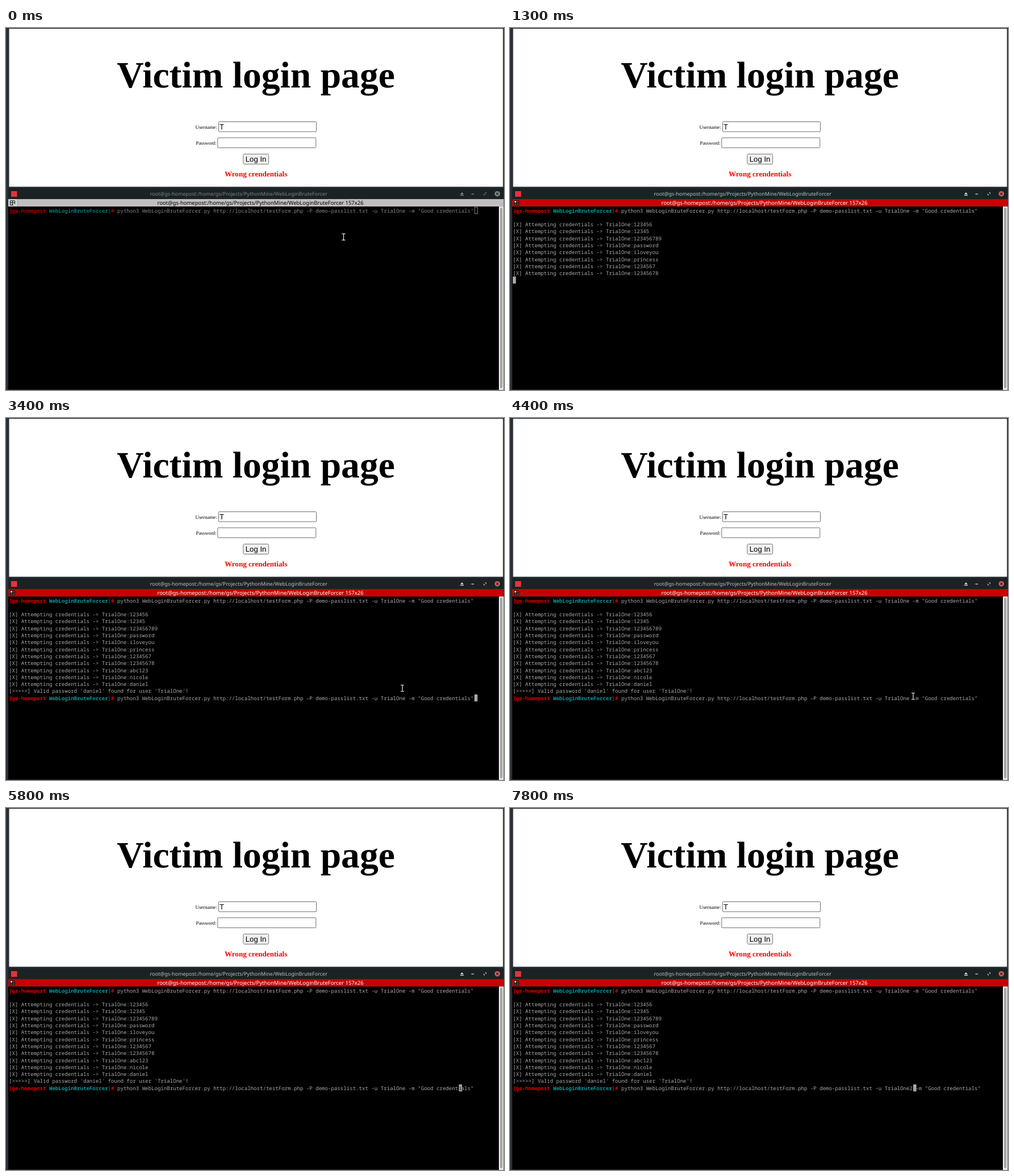
An HTML page that plays this animation: 877 by 639 pixels, repeating every 8 s.

```html
<!DOCTYPE html>
<html lang="en">
<head>
<meta charset="utf-8">
<title>Login form demo</title>
<style>
html, body { margin: 0; width: 100%; height: 100%; overflow: hidden; background: #2b2f37; }
svg { display: block; width: 877px; height: 639px; }
text { white-space: pre; text-rendering: geometricPrecision; }
.mid { text-anchor: middle; }
.serif { font-family: "Liberation Serif", serif; }
.sans { font-family: "Liberation Sans", sans-serif; font-size: 13.16px; }
.label { font-size: 8.77px; }
.ui { font-family: "Noto Sans", sans-serif; }
.mono { font-family: "Noto Sans Mono", monospace; font-size: 9.11px; }
.field { fill: #fff; stroke: #6e6e6e; }
.host { fill: #e00000; font-weight: bold; }
.dir { fill: #06989a; font-weight: bold; }
.dim { opacity: .78; }
</style>
</head>
<body>
<svg viewBox="0 0 877 639">
  <rect width="877" height="639" fill="#2b2f37"/>
  <rect x="5.5" y="1.4" width="869.7" height="278.8" fill="#fff"/>
  <text class="serif mid" x="440.1" y="104.6" font-size="65.6" font-weight="bold">Victim login page</text>
  <text class="serif label" x="333.6" y="178">Username:</text>
  <rect class="field" x="374.5" y="165.5" width="172" height="17.5" rx="1"/>
  <text class="sans" x="375.9" y="178.7">T</text>
  <text class="serif label" x="334.6" y="206.2">Password:</text>
  <rect class="field" x="372.8" y="193.8" width="173" height="17.6" rx="1"/>
  <rect x="417.8" y="222.5" width="44.8" height="17.8" rx="2" fill="#efefef" stroke="#767676"/>
  <text class="sans mid" x="440.1" y="236">Log In</text>
  <text class="serif mid" x="440.1" y="262.3" font-size="13.12" font-weight="bold" fill="#f00">Wrong crendentials</text>

  <rect x="4" y="282.5" width="872.5" height="19.5" fill="#1b2224"/>
  <rect x="9" y="288" width="10.5" height="10" fill="#e2343a"/>
  <g id="title"></g>
  <g id="tab"></g>
  <rect x="4" y="315.2" width="864" height="322.8" fill="#000"/>
  <rect x="868" y="315.2" width="8.3" height="323.6" fill="#f0f0f0"/>
  <rect x="870" y="317" width="4.4" height="319" rx="2.2" fill="#a6a6a6"/>
  <g id="term"></g>
  <g id="mouse">
    <path d="M-3 -5.5H3M0 -5.5V5.5M-3 5.5H3" fill="none" stroke="#000" stroke-width="3"/>
    <path d="M-3 -5.5H3M0 -5.5V5.5M-3 5.5H3" fill="none" stroke="#eee" stroke-width="1.2"/>
  </g>
</svg>
<script>
const LOOP = 8000, STEP = 100;
const LEFT = 5, TOP = 315.9, COL = 5.466, ROW = 12.29;
const USER = 'TrialOne', HOST = 'gs-homepost', TOOL = 'WebLoginBruteForcer';
const PATH = `root@${HOST}:/home/gs/Projects/PythonMine/${TOOL}`;
const HEAD = `python3 ${TOOL}.py http://localhost/testForm.php -P demo-passlist.txt -u ${USER}`;
const TAIL = ' -m "Good credentials"';
const COMMAND = HEAD + TAIL;
const PROMPT = `[${HOST} ${TOOL}]# `;
const START = PROMPT.length, END = START + COMMAND.length, EDIT = START + HEAD.length;
const PROMPT_SPANS = `<tspan class="host">[${HOST} </tspan><tspan class="dir">${TOOL}</tspan><tspan class="host">]# </tspan>`;

const guesses = '123456 12345 123456789 password iloveyou princess 1234567 12345678 abc123 nicole daniel'.split(' ');
const output = ['', ...guesses.map(g => `[X] Attempting credentials -&gt; ${USER}:${g}`),
  `[&gt;&gt;&gt;&gt;&gt;] Valid password 'daniel' found for user '${USER}'!`];

// time, x, y of the pointer
const route = [
  [3100, 688, 444], [3400, 698, 477], [3600, 701.5, 487], [3800, 703.5, 492], [3900, 703.5, 492],
  [4000, 704.7, 493], [4100, 705.5, 493], [4300, 705.5, 493], [4400, 710, 491],
  [4600, 710.5, 491.5], [4800, 710, 491], [5000, 710, 491], [5500, 726, 452]
];
// spans of time in which the text cursor is dark
const dark = [[900, 1200], [1800, 2000], [2700, 3300], [4000, 4600], [5200, 5600], [7300, 7800]];

const $ = id => document.getElementById(id);
const within = (t, a, b) => t >= a && t < b;

function line(row, html, fill = '#aaa', col = 0) {
  const x = LEFT + col * COL, y = TOP + row * ROW + 9.7;
  return `<text class="mono" x="${x}" y="${y}" fill="${fill}">${html}</text>`;
}

function cursor(row, col, char, focused) {
  const x = LEFT + col * COL, y = TOP + row * ROW;
  if (!focused) return `<rect x="${x + .5}" y="${y + .5}" width="5" height="11.5" fill="none" stroke="#aaa"/>`;
  return `<rect x="${x}" y="${y}" width="${COL}" height="${ROW}" fill="#aaa"/>` + line(row, char, '#000', col);
}

function drawTitle(focused) {
  const ink = focused ? '#bcc1c2' : '#7c8486';
  const icon = focused ? '#dde0e1' : '#8d9496';
  $('title').innerHTML =
    `<text class="ui mid" x="409.7" y="296" font-size="9" fill="${ink}">${PATH}</text>
    <path d="M800 293.5L803 290L806 293.5ZM800 294.8H806V296H800ZM819.5 292.5H824V293.7H819.5Z" fill="${icon}"/>
    <path d="M843.3 290.8H845.6V293M843.7 294.7H841.4V292.5" fill="none" stroke="${icon}" stroke-width=".9"/>
    <circle cx="865.3" cy="292.7" r="4.8" fill="${focused ? '#d9555a' : '#7d8587'}"/>
    <path d="M863.4 290.8L867.2 294.6M867.2 290.8L863.4 294.6" stroke="#1b2224" stroke-width="1.2"/>`;
}

function drawTab(focused) {
  const ink = focused ? '#fff' : '#000';
  const icon = focused
    ? `<rect x="7" y="304.5" width="9" height="8.5" fill="#1a0a0c"/>
      <path d="M8 305.5H11V308H8Z" fill="#fff"/><path d="M12.3 305.5H15V308H12.3ZM8 309.4H11V312H8ZM12.3 309.4H15V312H12.3Z" fill="#b0343c"/>`
    : `<rect x="4" y="302" width="16" height="13.2" fill="#d2d1d1"/><path d="M20.3 302.5V315" stroke="#989697" stroke-width=".7"/>
      <path d="M7.5 305H15.5V308.5H7.5ZM7.5 308.5V312.5H13M11.3 305V312.5M15.5 308.5V310.5" fill="none" stroke="#111"/>`;
  $('tab').innerHTML =
    `<rect x="4" y="302" width="872.5" height="13.2" fill="${focused ? '#c80003' : '#c0bebf'}"/>${icon}
    <text class="ui mid" x="448" y="312.2" font-size="9.47" fill="${ink}">${PATH} 157x26</text>`;
}

// column of the text cursor while Left is held down
function editColumn(t) {
  if (t < 5600) return END;
  if (t >= 7800) return EDIT + 1;
  return Math.max(EDIT, END - 1 - (t - 5600) / STEP * 2);
}

function drawTerm(t) {
  const focused = t >= 300;
  const shown = t < 1200 ? 0 : t < 1300 ? 4 : t < 1400 ? 9 : output.length;
  const typed = t < 2100 ? '' : t < 7800 ? COMMAND : HEAD + '2' + TAIL;
  let html = line(0, PROMPT_SPANS + COMMAND);
  for (let i = 0; i < shown; i++) html += line(i + 1, output[i]);
  const done = shown === output.length;
  if (done) html += line(14, PROMPT_SPANS + typed);

  let row = 0, col = END;
  if (done) {
    row = 14;
    col = typed ? editColumn(t) : START;
  } else if (shown) {
    row = shown + 1;
    col = 0;
  }
  if (!dark.some(([a, b]) => within(t, a, b))) {
    html += cursor(row, col, done ? typed[col - START] || '' : '', focused);
  }
  $('term').innerHTML = html;
  $('term').setAttribute('class', focused ? '' : 'dim');
}

function pointer(t) {
  if (t < 1200) return [594.5, 368.8];
  if (!within(t, 3100, 5600)) return null;
  const i = route.findIndex(p => p[0] >= t);
  if (i === 0) return route[0].slice(1);
  const a = route[i - 1], b = route[i], k = (t - a[0]) / (b[0] - a[0]);
  return [a[1] + (b[1] - a[1]) * k, a[2] + (b[2] - a[2]) * k];
}

function drawMouse(t) {
  const p = pointer(t);
  $('mouse').setAttribute('visibility', p ? 'visible' : 'hidden');
  if (p) $('mouse').setAttribute('transform', `translate(${p[0]} ${p[1]})`);
}

let last = -1;
function frame(now) {
  const t = Math.floor(now % LOOP / STEP) * STEP;
  if (t !== last) {
    last = t;
    drawTitle(t >= 400);
    drawTab(t >= 300);
    drawTerm(t);
    drawMouse(t);
  }
  requestAnimationFrame(frame);
}
frame(0);
</script>
</body>
</html>
```
